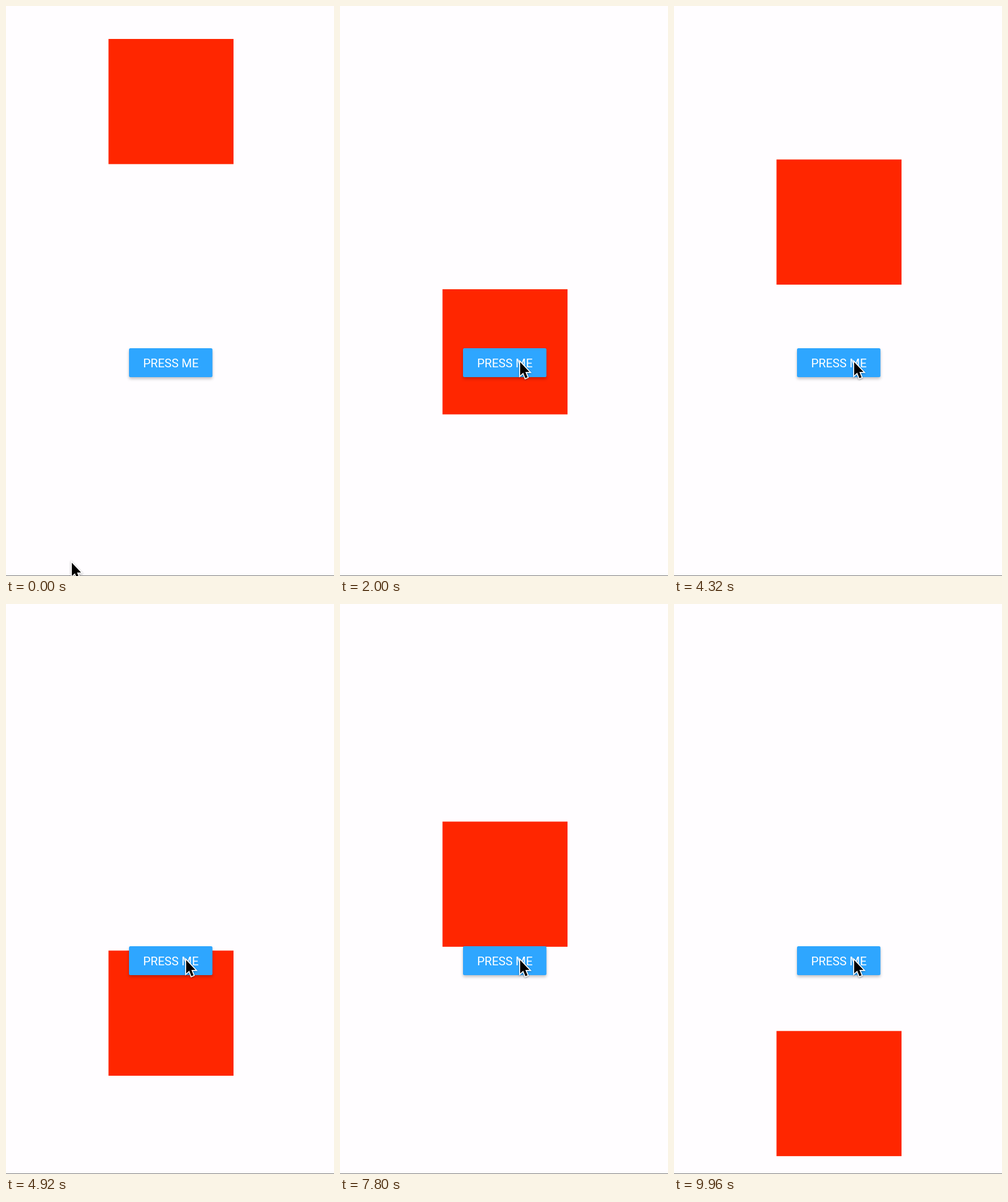
An HTML page that plays this animation: 568 by 986 pixels, repeating every 10000 ms.

```html
<!DOCTYPE html>
<html lang="en">
<head>
<meta charset="utf-8">
<title>Decay drop</title>
<style>
  html, body { margin: 0; width: 100%; height: 100%; overflow: hidden; background: #fffdff; }
  svg { display: block; width: 568px; height: 986px; }
  #button { filter: drop-shadow(0 3px 2.5px rgba(0, 0, 0, .24)); }
  #cursor { filter: drop-shadow(0 1.5px 1.5px rgba(0, 0, 0, .4)); }
  text { font: 400 20.5px Roboto, Arial, sans-serif; fill: #fff; text-anchor: middle; }
</style>
</head>
<body>
<svg viewBox="0 0 568 986">
  <rect width="568" height="986" fill="#fffdff"/>
  <rect id="box" x="177.5" y="57" width="216.5" height="216.5" fill="#ff2600"/>
  <rect id="button" x="213" y="592" width="144.5" height="50" rx="2.5" fill="#2ea6ff"/>
  <text x="285.5" y="625">PRESS ME</text>
  <rect y="985" width="568" height="1" fill="#777"/>
  <g id="cursor">
    <path d="M2 4V27L7.3 22.2L11 31.8L14.8 30.2L11 21H18Z" fill="#000"
          stroke="#fff" stroke-width="3.4" paint-order="stroke"/>
  </g>
</svg>
<script>
  const LOOP = 10000, STEP = 40;
  const TOP = 57, TRAVEL = 686.5, RATE = 0.002, SETTLE = 2580;
  const presses = [1502, 4139, 7487];

  // Cursor stops: time, x, y
  const path = [
    [0, 112, 959], [360, 275, 612], [640, 275, 612], [760, 243, 650],
    [880, 268, 707], [980, 322, 660], [1050, 336, 594], [1120, 310, 612]
  ];

  const box = document.getElementById('box');
  const cursor = document.getElementById('cursor');
  const smooth = u => u * u * (3 - 2 * u);

  // Exponential decay, restarted from the top by each press
  function boxY(t) {
    const start = presses.filter(p => p <= t).pop();
    if (start === undefined) return TOP;
    const age = Math.min(t - start, SETTLE);
    return TOP + TRAVEL * (1 - Math.exp(-RATE * age));
  }

  function cursorAt(t) {
    const i = path.findIndex(p => p[0] > t);
    if (i < 0) return path[path.length - 1].slice(1);
    const [t0, x0, y0] = path[i - 1], [t1, x1, y1] = path[i];
    let u = (t - t0) / (t1 - t0);
    if (i === 1) u = smooth(u);
    return [x0 + (x1 - x0) * u, y0 + (y1 - y0) * u];
  }

  function draw(ms) {
    const t = Math.floor((ms % LOOP + 0.5) / STEP) * STEP % LOOP;
    box.setAttribute('y', boxY(t).toFixed(2));
    cursor.setAttribute('transform', `translate(${cursorAt(t)})`);
  }

  const begin = performance.now();
  function tick() {
    draw(performance.now() - begin);
    requestAnimationFrame(tick);
  }
  tick();
</script>
</body>
</html>
```
